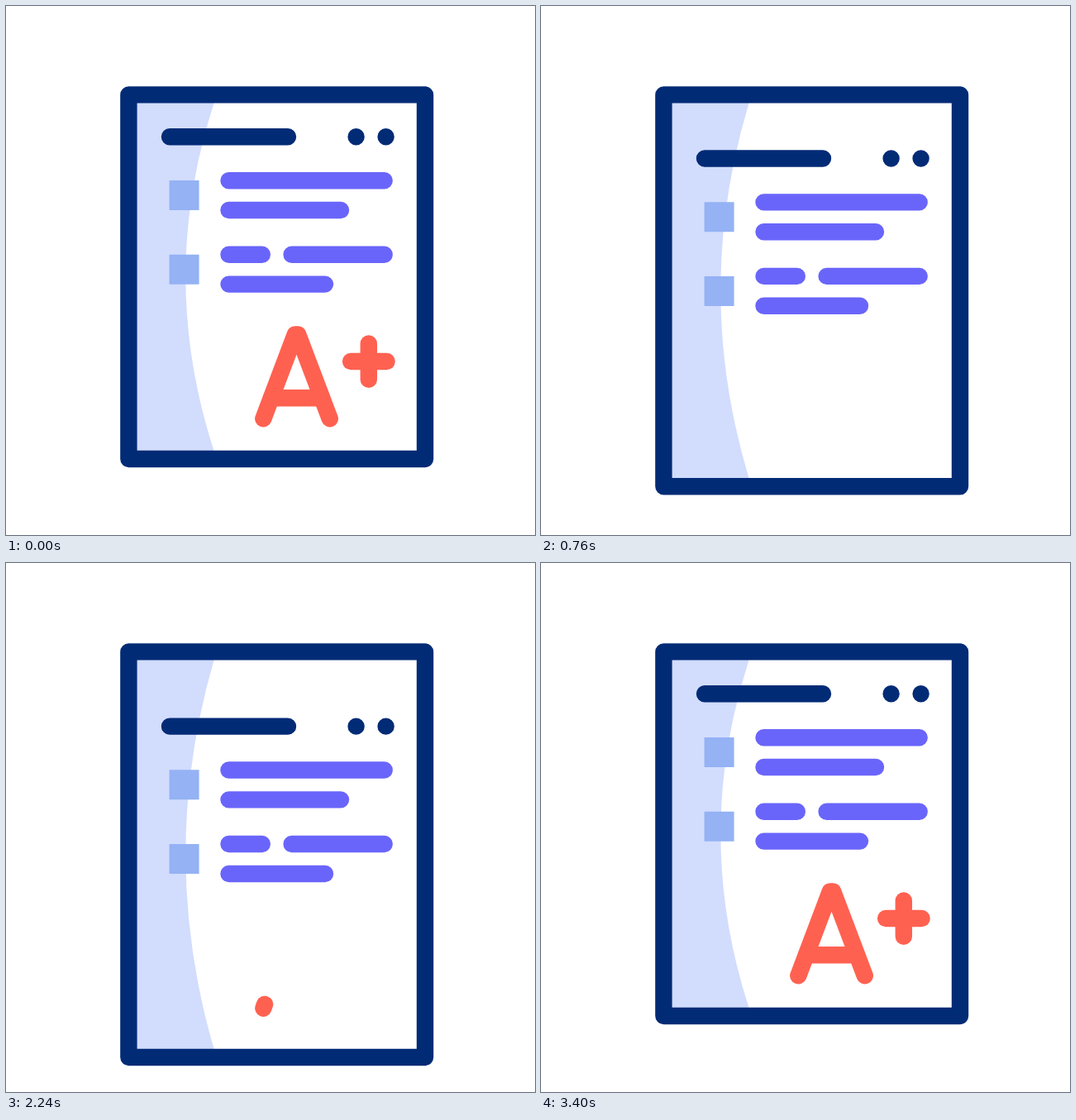
Recreate the animation shown at these times as an HTML page. Size 640x640 px, loop 3.62 s.

```html
<!DOCTYPE html>
<html lang="en">
<head>
<meta charset="utf-8">
<title>Graded test</title>
<style>
  html, body { margin: 0; width: 100%; height: 100%; overflow: hidden; background: #fff; }
  svg { display: block; width: 100vw; height: 100vh; }
  .line { fill: none; stroke-width: 20.4; stroke-linecap: round; stroke-linejoin: round; }
  .navy { stroke: #022b76; }
  .violet { stroke: #6a65fa; }
  .red { stroke: #ff6151; }
</style>
</head>
<body>
<svg viewBox="0 0 640 640">
  <path id="shade" fill="#d2dcfd"/>
  <path id="sheet" class="line navy"/>
  <g id="content">
    <path fill="#94b2f4" d="M197.6 211h36v36h-36zM197.6 300.7h36v36h-36z"/>
    <path class="line navy" d="M198 158.3H341M423.6 158.3h.01M459.6 158.3h.01"/>
    <path class="line violet" d="M269.5 211.2H457.7M269.5 247H405M269.5 300.7H309.8M345.6 300.7H457.7M269.5 336.6H386"/>
    <g id="grade" class="line red">
      <path pathLength="1" d="M311.3 499.3L349.8 397.4H353.2L391.8 499.3"/>
      <path pathLength="1" d="M321 474.2H382"/>
      <path pathLength="1" d="M417.1 430H460.6"/>
      <path pathLength="1" d="M438.8 408.5V451.9"/>
    </g>
    <g id="checks" class="line navy">
      <path pathLength="1" d="M196.6 209.3L216.4 229.2L253 192.8"/>
      <path pathLength="1" d="M196.6 306.9L216.4 326.8L253 290.4"/>
    </g>
  </g>
</svg>
<script>
const LOOP = 3620;
const GROW = 200, SHRINK = 2183, RESIZE = 924;
const DRAW = 600, CHECK = 320;
const gradeStarts = [2187, 2354, 2552, 2790];
const checkStarts = [1110, 1280];

const $ = id => document.getElementById(id);
const shade = $('shade'), sheet = $('sheet'), content = $('content');
const grade = $('grade'), checks = $('checks');

// Smooth 0..1 progress of a step
function ease(t, start, length) {
  const u = Math.min(1, Math.max(0, (t - start) / length));
  return u * u * (3 - 2 * u);
}

function trim(path, p) {
  path.style.visibility = p > 0 ? 'visible' : 'hidden';
  path.setAttribute('stroke-dasharray', p < 1 ? `${p} 3` : 'none');
}

function render(t) {
  const open = ease(t, GROW, RESIZE) - ease(t, SHRINK, RESIZE);
  const bottom = 548 + 50.5 * open;
  const mid = (107.4 + bottom) / 2;
  sheet.setAttribute('d', `M148.4 107.4H507V${bottom}H148.4Z`);
  shade.setAttribute('d', `M150 117H251.7Q183 ${mid} 251.7 ${bottom - 9.6}H150Z`);
  content.setAttribute('transform', `translate(0 ${39.8 * open})`);

  const fading = t < SHRINK;
  grade.setAttribute('opacity', fading ? 1 - ease(t, GROW, 520) : 1);
  gradeStarts.forEach((s, i) => trim(grade.children[i], fading ? 1 : ease(t, s, DRAW)));

  checks.setAttribute('opacity', 1 - ease(t, 1860, 260));
  checkStarts.forEach((s, i) => trim(checks.children[i], ease(t, s, CHECK)));
}

function tick() {
  render(performance.now() % LOOP);
  requestAnimationFrame(tick);
}
tick();
</script>
</body>
</html>
```
